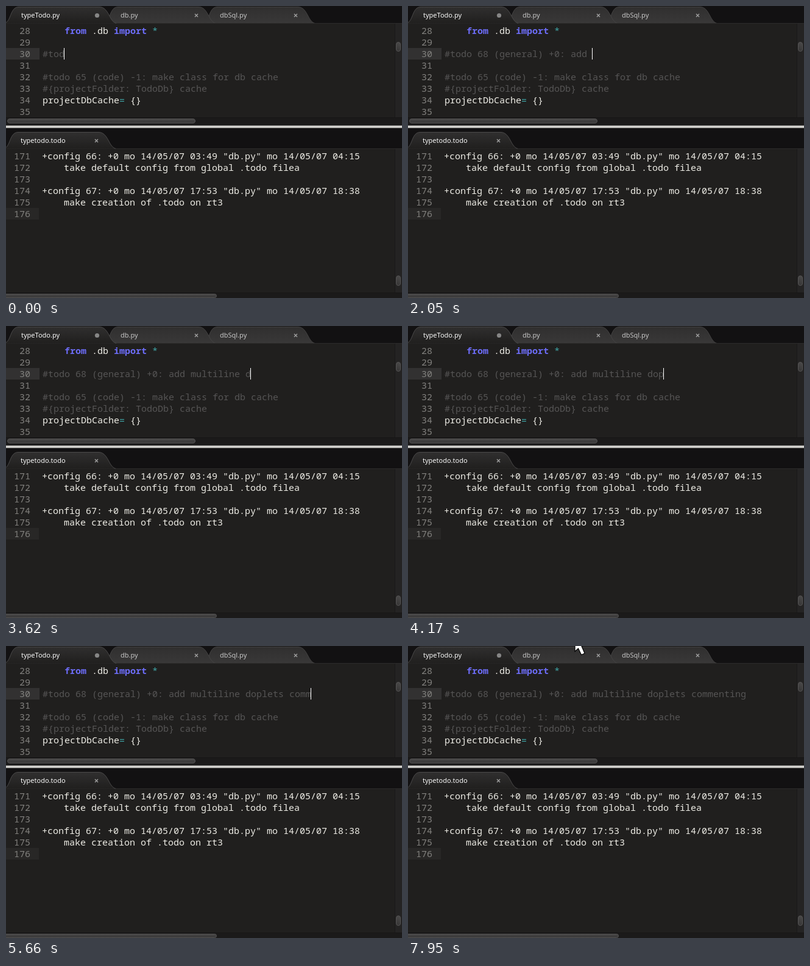
An HTML page with a canvas that plays this animation: 650x480 px, repeating every 8 s.

```html
<!DOCTYPE html>
<html lang="en">
<head>
<meta charset="utf-8">
<title>Todo editor</title>
<style>
  html, body { margin: 0; width: 100%; height: 100%; overflow: hidden; background: #201f1e; }
  canvas { display: block; }
</style>
</head>
<body>
<canvas id="stage" width="650" height="480"></canvas>
<script>
const ctx = document.getElementById('stage').getContext('2d');
const LOOP = 8000, CHAR = 9, LINE = 19, TOP_X = 60, BOTTOM_X = 59;
const MONO = '15px "Noto Sans Mono", "Liberation Mono", monospace';
const LABEL = '11px "Noto Sans", "Open Sans", sans-serif';
const BG = '#201f1e', PLAIN = '#eeede6', COMMENT = '#565555',
      KEYWORD = '#6c6cf6', OPERATOR = '#3fa9ab', NUMBER = '#82817e';

const TYPED = '#todo 68 (general) +0: add multiline doplets commenting';
// Each burst: first key, last key, number of keys.
const BURSTS = [[1220, 1220, 1], [1560, 2380, 6], [2630, 3620, 8], [3900, 4870, 7],
                [5140, 5300, 2], [5570, 5660, 2], [6247, 7030, 6]];
// Caret opacity from each time on.
const CARET = [[0, 1], [860, .65], [950, .3], [1040, 0], [1220, 1], [6090, .65],
               [6247, 1], [7370, .65], [7460, .3], [7550, 0]];

function typedLength(t) {
  if (t < 60) return 4;
  if (t < 490) return 5;
  return BURSTS.reduce((sum, [start, end, keys]) => {
    if (t < start) return sum;
    if (t >= end) return sum + keys;
    return sum + 1 + Math.floor((t - start) / (end - start) * (keys - 1));
  }, 23);
}

function rect(x, y, w, h, color) {
  ctx.fillStyle = color;
  ctx.fillRect(x, y, w, h);
}

function gradient(y0, y1, from, to) {
  const g = ctx.createLinearGradient(0, y0, 0, y1);
  g.addColorStop(0, from);
  g.addColorStop(1, to);
  return g;
}

function polygon(points) {
  ctx.beginPath();
  points.forEach(([x, y]) => ctx.lineTo(x, y));
  ctx.closePath();
}

function write(text, x, y, color, font = MONO) {
  ctx.font = font;
  ctx.fillStyle = color;
  ctx.fillText(text, x, y);
}

function code(text, x, column, y, color = PLAIN, bold = false) {
  write(text, x + column * CHAR, y, color, (bold ? 'bold ' : '') + MONO);
}

function lineNumbers(first, count, baseline) {
  for (let i = 0; i < count; i++) {
    const label = String(first + i);
    write(label, 40 - label.length * CHAR, baseline + i * LINE, NUMBER);
  }
}

function tab(x, top, title, active, dirty) {
  const bottom = top + 27, left = x - 3, right = x + 181;
  ctx.beginPath();
  ctx.moveTo(left, bottom);
  ctx.bezierCurveTo(left + 12, bottom - 2, left + 9, top, left + 24, top);
  ctx.lineTo(right - 28, top);
  ctx.bezierCurveTo(right - 12, top, right - 12, bottom - 3, right, bottom);
  ctx.fillStyle = active ? gradient(top, bottom, '#302f2f', BG)
                         : gradient(top, bottom, '#302f2f', '#393838');
  ctx.fill();
  ctx.strokeStyle = active ? '#4b4a4a' : '#454444';
  ctx.lineWidth = 1;
  ctx.stroke();
  write(title, x + 25, top + 17.5, active ? '#f6f6f6' : '#c4c4c4', LABEL);

  const cx = x + 149.5, cy = top + 14;
  ctx.beginPath();
  if (dirty) {
    ctx.arc(cx, cy, 3.6, 0, Math.PI * 2);
    ctx.fillStyle = '#868686';
    ctx.fill();
  } else {
    ctx.moveTo(cx - 2.5, cy - 2.5);
    ctx.lineTo(cx + 2.5, cy + 2.5);
    ctx.moveTo(cx + 2.5, cy - 2.5);
    ctx.lineTo(cx - 2.5, cy + 2.5);
    ctx.strokeStyle = '#a0a0a0';
    ctx.lineWidth = 1.4;
    ctx.stroke();
  }
}

function thumb(x, y, w, h) {
  ctx.beginPath();
  ctx.roundRect(x + .5, y + .5, w - 1, h - 1, 3.5);
  ctx.fillStyle = gradient(y, y + h, '#4a4949', '#363535');
  ctx.fill();
  ctx.strokeStyle = '#545353';
  ctx.lineWidth = 1;
  ctx.stroke();
}

function scrollbars(top, trackY, trackH) {
  rect(638, top, 12, trackY - top, '#242323');
  rect(638, top, 1, trackY - top, '#1a1919');
  rect(0, trackY, 650, trackH, '#1b1a1a');
  rect(0, trackY, 650, 1, '#171616');
}

function typedLine(t) {
  const length = typedLength(t);
  code(TYPED.slice(0, length), TOP_X, 0, 84, COMMENT);
  ctx.globalAlpha = CARET.filter(([start]) => t >= start).pop()[1];
  rect(TOP_X - 1 + length * CHAR, 69, 1, LINE, '#ffffff');
  ctx.globalAlpha = 1;
}

function topPane(t) {
  rect(0, 0, 650, 29, '#121112');
  tab(326, 1.5, 'dbSql.py', false);
  tab(163, 1.5, 'db.py', false);
  rect(0, 28, 650, 1, '#2c2b2b');
  tab(0, 1.5, 'typeTodo.py', true, true);
  rect(0, 29, 650, 167, BG);
  rect(0, 69, 55, LINE, '#323131');

  lineNumbers(28, 8, 46);
  code('from', TOP_X, 4, 46, KEYWORD, true);
  code('.db', TOP_X, 9, 46);
  code('import', TOP_X, 13, 46, KEYWORD, true);
  code('*', TOP_X, 20, 46, OPERATOR);
  typedLine(t);
  code('#todo 65 (code) -1: make class for db cache', TOP_X, 0, 122, COMMENT);
  code('#{projectFolder: TodoDb} cache', TOP_X, 0, 141, COMMENT);
  code('projectDbCache', TOP_X, 0, 160);
  code('=', TOP_X, 14, 160, OPERATOR);
  code('{}', TOP_X, 16, 160);

  scrollbars(29, 183, 13);
  thumb(640, 59, 8, 16);
  thumb(2, 185, 309, 8);
}

function bottomPane() {
  rect(0, 201, 650, 34, '#121112');
  rect(0, 234, 650, 1, '#2c2b2b');
  tab(-1, 207.5, 'typetodo.todo', true);
  rect(0, 235, 650, 245, BG);
  rect(0, 332, 54, LINE, '#282726');

  lineNumbers(171, 6, 252);
  code('+config 66: +0 mo 14/05/07 03:49 "db.py" mo 14/05/07 04:15', BOTTOM_X, 0, 252);
  code('take default config from global .todo filea', BOTTOM_X, 4, 271);
  code('+config 67: +0 mo 14/05/07 17:53 "db.py" mo 14/05/07 18:38', BOTTOM_X, 0, 309);
  code('make creation of .todo on rt3', BOTTOM_X, 4, 328);

  scrollbars(235, 471, 9);
  thumb(640, 443, 8, 17);
  thumb(-4, 473, 350, 7);
}

function pointer() {
  polygon([[274, -18], [274, 9], [279.5, 4], [284.5, 14.5], [290, 12], [285, .5], [291, -1]]);
  ctx.fillStyle = '#ffffff';
  ctx.fill();
  ctx.strokeStyle = '#000000';
  ctx.lineWidth = 1.2;
  ctx.stroke();
}

function draw(now) {
  const t = now % LOOP;
  topPane(t);
  bottomPane();
  rect(0, 196, 650, 5, '#6f6e6c');
  rect(0, 197, 650, 3, '#d3d2ce');
  if (t >= 7950) pointer();
}

function frame() {
  draw(performance.now());
  requestAnimationFrame(frame);
}
frame();
</script>
</body>
</html>
```
